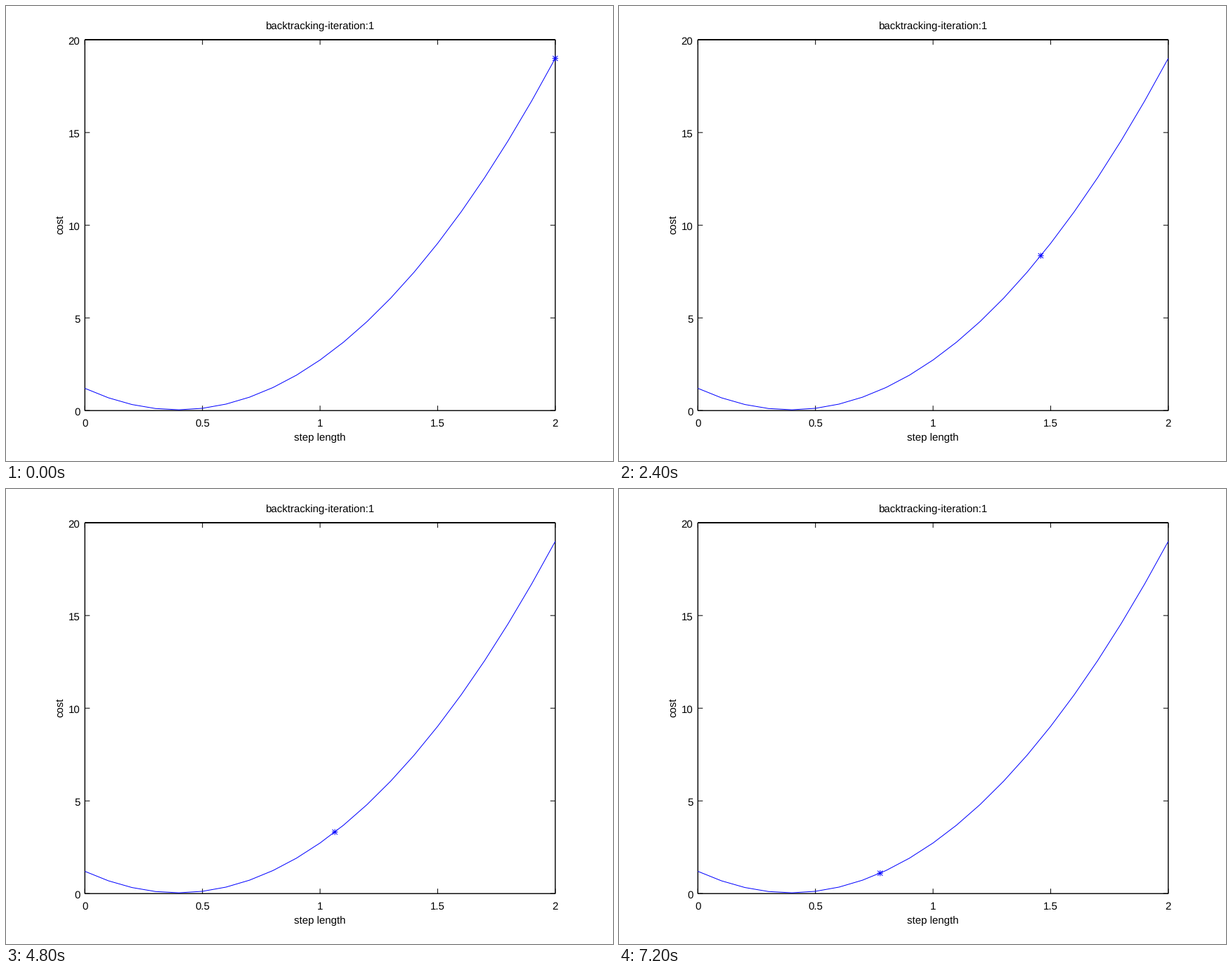
A matplotlib script that plays this animation: 864x648 px, repeating every 8000 ms.

```python
import matplotlib.pyplot as plt
import numpy as np
from matplotlib.animation import FuncAnimation

W, H = 864, 648
FRAMES, INTERVAL = 10, 800
X_MAX, Y_MAX = 2, 20
TICK = 7
BLUE = "#0000ff"

# plot boxes as left, top, right, bottom in pixels
WIDE = (112.3, 48.2, 781.8, 576.2)
NARROW = (109.3, 47.3, 760, 560.5)
NARROW_STEPS = (2, 4)

plt.rcParams["font.family"] = "Liberation Sans"
plt.rcParams["font.size"] = 15
plt.rcParams["text.hinting"] = "none"

# at 72 dpi one point is one pixel
fig = plt.figure(figsize=(W / 72, H / 72), dpi=72, facecolor="white")
ax = fig.add_axes([0, 0, 1, 1])
ax.set_xlim(0, W)
ax.set_ylim(H, 0)
ax.axis("off")


def cost(t):
    return 7.37 * t**2 - 5.84 * t + 1.2


def to_pixels(box, t, c):
    left, top, right, bottom = box
    return left + (right - left) * t / X_MAX, bottom - (bottom - top) * c / Y_MAX


def line(xs, ys, color="black", width=1.0):
    return ax.plot(xs, ys, color=color, lw=width, solid_capstyle="butt",
                   solid_joinstyle="miter", snap=False)[0]


def label(x, y, text, ha="center", rotation=0):
    return ax.text(x, y, text, ha=ha, va="baseline", rotation=rotation,
                   rotation_mode="anchor")


def build_chart(box):
    left, top, right, bottom = box
    mid_x, mid_y = (left + right) / 2, (top + bottom) / 2
    parts = [line([left, right, right, left, left, right],
                  [top, top, bottom, bottom, top, top], width=1.4)]

    for t in np.linspace(0, X_MAX, 5):
        x, _ = to_pixels(box, t, 0)
        parts += [line([x, x], [bottom, bottom - TICK]),
                  line([x, x], [top, top + TICK]),
                  label(x, bottom + 22.5, f"{t:g}")]
    for c in range(0, Y_MAX + 1, 5):
        _, y = to_pixels(box, 0, c)
        parts += [line([left, left + TICK], [y, y]),
                  line([right, right - TICK], [y, y]),
                  label(left - 7, y + 7, f"{c}", ha="right")]

    parts += [label(mid_x, top - 15.2, "backtracking-iteration:1"),
              label(mid_x, bottom + 42.2, "step length"),
              label(left - 31, mid_y - 1, "cost", rotation=90)]

    t = np.linspace(0, X_MAX, 21)
    parts.append(line(*to_pixels(box, t, cost(t)), color=BLUE))
    return parts


charts = {box: build_chart(box) for box in (WIDE, NARROW)}

# eight-armed star: a plus and a slightly shorter cross
ARMS = [(4.2, 0), (0, 4.2), (3.6, 3.6), (3.6, -3.6)]
star = [line([], [], color=BLUE) for _ in ARMS]


def update(step):
    active = NARROW if step in NARROW_STEPS else WIDE
    for box, parts in charts.items():
        for part in parts:
            part.set_visible(box is active)

    # each backtracking step shrinks the length by a tenth
    t = X_MAX * 0.9**step
    x, y = to_pixels(active, t, cost(t))
    for arm, (dx, dy) in zip(star, ARMS):
        arm.set_data([x - dx, x + dx], [y - dy, y + dy])
    return star


anim = FuncAnimation(fig, update, frames=FRAMES, interval=INTERVAL,
                     init_func=lambda: update(0), repeat=True, repeat_delay=0,
                     blit=False)
plt.show()
```
